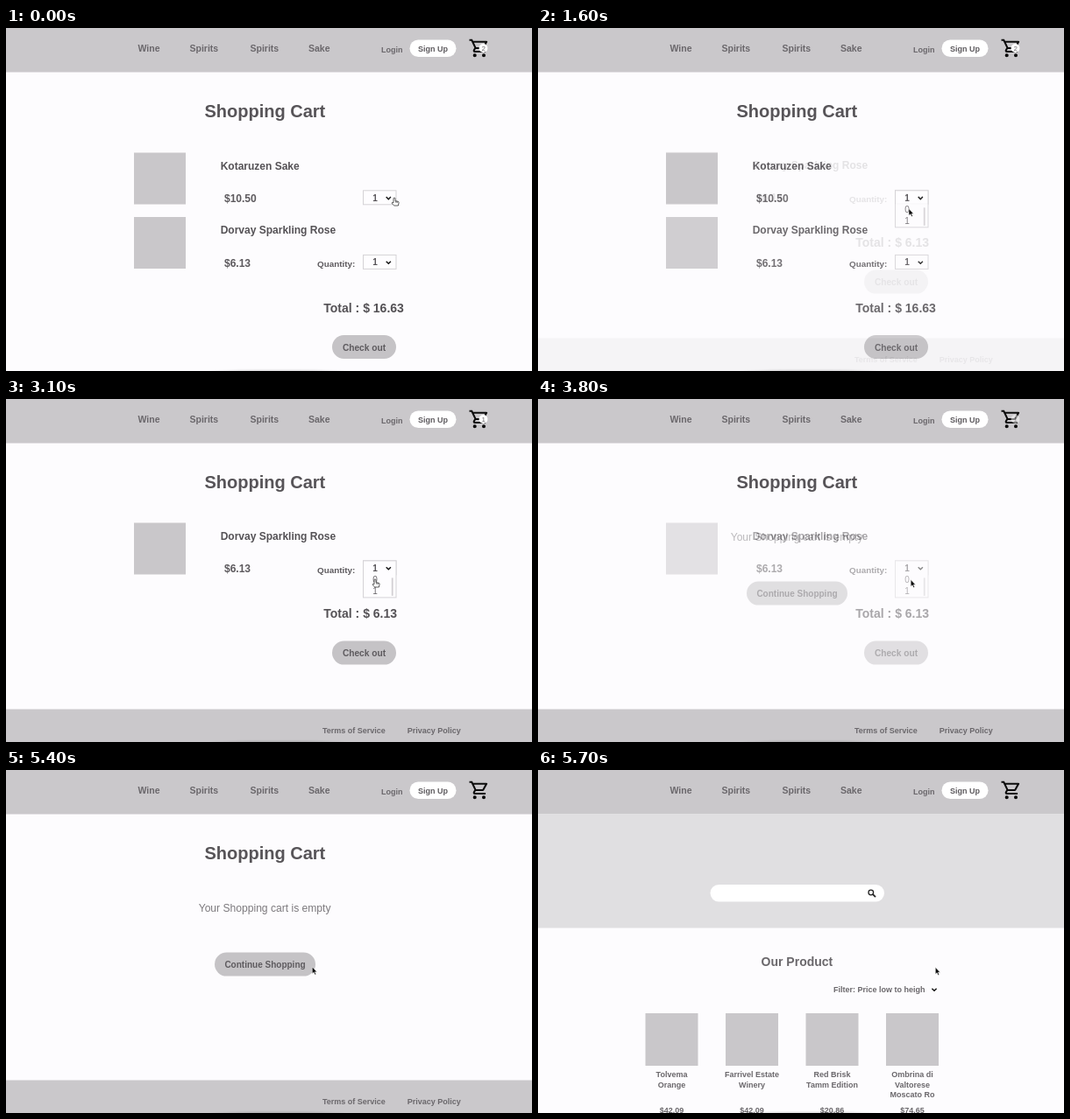
These frames come from a looping animation (600 px wide and 392 px high, 5800 ms). An HTML page:

```html
<!DOCTYPE html>
<html lang="en">
<head>
<meta charset="utf-8">
<title>Shopping cart</title>
<style>
  html, body { margin: 0; width: 100%; height: 100%; overflow: hidden; background: #fdfcfe; }
  svg { display: block; width: 100vw; height: 100vh; }
  text { font-family: "Liberation Sans", Arial, sans-serif; font-weight: 700; white-space: pre; }
</style>
</head>
<body>
<svg id="stage" viewBox="0 0 600 392"></svg>
<script>
const LOOP = 5800, STEP = 100, FADE = 300;
const PAGE = '#fdfcfe', BAR = '#cac8cb', TILE = '#c9c7ca', BUTTON = '#c5c3c6';
const DARK = '#545155', MID = '#5d5a5e', SOFT = '#6a676b';

const rect = (x, y, w, h, fill, more = '') =>
  `<rect x="${x}" y="${y}" width="${w}" height="${h}" fill="${fill}" ${more}/>`;
const pill = (x, y, w, h, fill) => rect(x, y, w, h, fill, `rx="${h / 2}"`);
const text = (s, x, y, size, fill = MID, more = '') =>
  `<text x="${x}" y="${y}" font-size="${size}" fill="${fill}" ${more}>${s}</text>`;
const centered = (s, x, y, size, fill, more = '') =>
  text(s, x, y, size, fill, `text-anchor="middle" ${more}`);
const chevron = (x, y) =>
  `<path d="M${x - 2.6} ${y - 1.3}l2.6 2.6 2.6-2.6" fill="none" stroke="#111" stroke-width="1.4"/>`;
const button = (label, x, y, w, size) =>
  pill(x, y, w, 27, BUTTON) + centered(label, x + w / 2, y + 17.6, size, MID);

const CART = 'M15.55 13c.75 0 1.41-.41 1.75-1.03l3.58-6.49A1 1 0 0 0 20 4H5.21l-.94-2H1v2h2l3.6 7.59' +
  '-1.35 2.44C4.52 15.37 5.48 17 7 17h12v-2H7l1.1-2zM6.16 6h12.15l-2.76 5H8.53z' +
  'M7 18a2 2 0 1 0 0 4 2 2 0 0 0 0-4zm10 0a2 2 0 1 0 0 4 2 2 0 0 0 0-4z';

function header(count) {
  const links = [['Wine', 150.5], ['Spirits', 209.5], ['Spirits', 278.5], ['Sake', 345]];
  return rect(0, 0, 600, 50.5, BAR) +
    links.map(([s, x]) => text(s, x, 27.3, 10.5, SOFT)).join('') +
    text('Login', 428, 28, 9, SOFT) +
    pill(460.5, 13.5, 53, 19.5, '#fff') +
    centered('Sign Up', 487, 26.8, 9, MID) +
    `<path transform="translate(527.5 10.6) scale(1.03)" d="${CART}" fill="#0c0c0c" fill-rule="evenodd"/>` +
    (count ? `<circle cx="544.5" cy="23" r="4.9" fill="#fff"/>` +
      centered(count, 544.7, 25.8, 8, SOFT, 'style="font-weight:400"') : '');
}

const footer = () => rect(0, 354.5, 600, 37.5, BAR) +
  text('Terms of Service', 361, 381.5, 9, SOFT) +
  text('Privacy Policy', 457.7, 381.5, 9, SOFT);

function select(y, height = 16) {
  return rect(407.5, y, 37.5, height, '#fefdff', 'stroke="#d5d3d6"') +
    centered('1', 421, y + 11.8, 10, DARK) + chevron(436.3, y + 8.6);
}

function list(id, y) {
  const option = (s, dy) => centered(s, 421, y + dy, 10, SOFT, 'style="font-weight:400"');
  return `<g id="${id}">` + select(y, 42) + option('0', 25.3) + option('1', 38.3) +
    rect(439.8, y + 19.5, 1.8, 20.5, '#d2d0d3') + '</g>';
}

const item = (name, price, y) => rect(146, y, 59, 59, TILE) +
  text(name, 244.7, y + 19, 12, DARK) + text(price, 249, y + 56.6, 12, MID);
const total = (sum, y) => text('Total : $ ' + sum, 362.3, y, 14, DARK);
const quantity = y => text('Quantity:', 355, y, 9.9, MID);

const page = (id, count, body) => `<g id="${id}">` + rect(0, 0, 600, 392, PAGE) +
  header(count) + body + '</g>';
const title = text('Shopping Cart', 226.5, 102, 20, '#575458');

const two = title +
  item('Kotaruzen Sake', '$10.50', 142.5) + select(185.8) +
  item('Dorvay Sparkling Rose', '$6.13', 216) + quantity(273) + select(259.4) +
  total('16.63', 324.6) + button('Check out', 372, 351, 73, 10.2) + list('listA', 185.8);

const one = title +
  item('Dorvay Sparkling Rose', '$6.13', 141.5) + quantity(198.7) + select(184.9) +
  total('6.13', 250) + button('Check out', 372, 276.6, 73, 10.2) + footer() + list('listB', 184.9);

const empty = title +
  text('Your Shopping cart is empty', 219.7, 162.2, 12.1, '#7c797d', 'style="font-weight:400"') +
  button('Continue Shopping', 238, 208.6, 115, 10) + footer();

const products = [
  ['$42.09', 'Tolvema', 'Orange'],
  ['$42.09', 'Farrivel Estate', 'Winery'],
  ['$20.86', 'Red Brisk', 'Tamm Edition'],
  ['$74.65', 'Ombrina di', 'Valtorese', 'Moscato Ro']
].map(([price, ...lines], i) => {
  const x = 122.5 + i * 91.5, mid = x + 30;
  return rect(x, 278, 60, 60, TILE) +
    lines.map((s, n) => centered(s, mid, 351.2 + n * 11.5, 9, SOFT)).join('') +
    centered(price, mid, 392.4, 9, SOFT);
}).join('');

const shop = rect(0, 50.5, 600, 130, '#e0dfe1') +
  pill(196.5, 131, 198.5, 19.5, '#fff') +
  '<g fill="none" stroke="#222"><circle cx="379.8" cy="140" r="2.8" stroke-width="1.3"/>' +
  '<path d="M382 142.200l3 3" stroke-width="1.700"/></g>' +
  text('Our Product', 254.6, 224, 14, SOFT) +
  text('Filter: Price low to heigh', 337, 253.6, 9, SOFT) + chevron(452, 251) + products;

const stage = document.getElementById('stage');
stage.innerHTML =
  '<defs><filter id="blur" x="-20%" y="-200%" width="140%" height="500%">' +
  '<feGaussianBlur stdDeviation="3 1.2"/></filter></defs>' +
  page('two', 2, two) + page('one', 1, one) + page('empty', 0, empty) + page('shop', 0, shop) +
  '<ellipse cx="310" cy="393.5" rx="76" ry="2.600" fill="#000" opacity=".16" filter="url(#blur)"/>' +
  '<g id="cursor">' +
  '<path id="arrow" d="M0 0V7.800l1.800-1.600 1.300 2.900 1.300-.6-1.300-2.700h2.300z" fill="#0a0a0a" stroke="#fff" stroke-width=".5"/>' +
  '<path id="hand" d="M-1.500 5.800V1a1 1 0 0 1 2 0v2.600l3 .6q1.200.3 1.100 1.500l-.7 3.300H-.7L-3.600 6.200q.4-1.500 2.100-.4z' +
  'M1.300 4v1.600M2.700 4.300v1.500" fill="#fff" stroke="#333" stroke-width=".8"/></g>';

const el = id => document.getElementById(id);
const show = (id, opacity) => {
  el(id).setAttribute('opacity', opacity);
  el(id).setAttribute('display', opacity > 0 ? 'inline' : 'none');
};

// start times of the ease-out dissolves
const FADES = { listA: 385, one: 1585, listB: 2685, empty: 3738, shop: 5420 };
const fade = (t, start) => 1 - (1 - Math.min(1, Math.max(0, (t - start) / FADE))) ** 3;

// pointer path: time, x, y
const PATH = [
  [0, 443.5, 194], [200, 440.2, 194], [300, 440.2, 194], [900, 423.3, 206.5], [1600, 423, 206.5],
  [1700, 426.3, 205.500], [2100, 437, 194], [2600, 437, 194], [3100, 421.5, 206], [3600, 422, 206],
  [3700, 422, 206], [3800, 425.2, 206.500], [4100, 428, 210.500], [4300, 428, 210.500],
  [4900, 348.500, 225.500], [5400, 349.3, 225], [5700, 453.3, 225.500], [5800, 453.3, 225.500]
];
const HAND = [[0, 400], [1000, 1400], [2500, 2700], [3100, 3600], [4900, 5300]];

function pointer(t) {
  const i = PATH.findIndex(p => p[0] > t);
  const [t0, x0, y0] = PATH[i - 1], [t1, x1, y1] = PATH[i];
  const u = (t - t0) / (t1 - t0), k = u * u * (3 - 2 * u);
  return [x0 + (x1 - x0) * k, y0 + (y1 - y0) * k];
}

function draw(time) {
  const t = Math.floor((time % LOOP) / STEP) * STEP;
  for (const id in FADES) show(id, fade(t, FADES[id]));
  const [x, y] = pointer(t);
  el('cursor').setAttribute('transform', `translate(${x} ${y})`);
  const hand = HAND.some(([a, b]) => t >= a && t < b);
  show('hand', hand ? 1 : 0);
  show('arrow', hand ? 0 : 1);
}

const begin = performance.now();
function tick() {
  draw(performance.now() - begin);
  requestAnimationFrame(tick);
}
tick();
</script>
</body>
</html>
```
